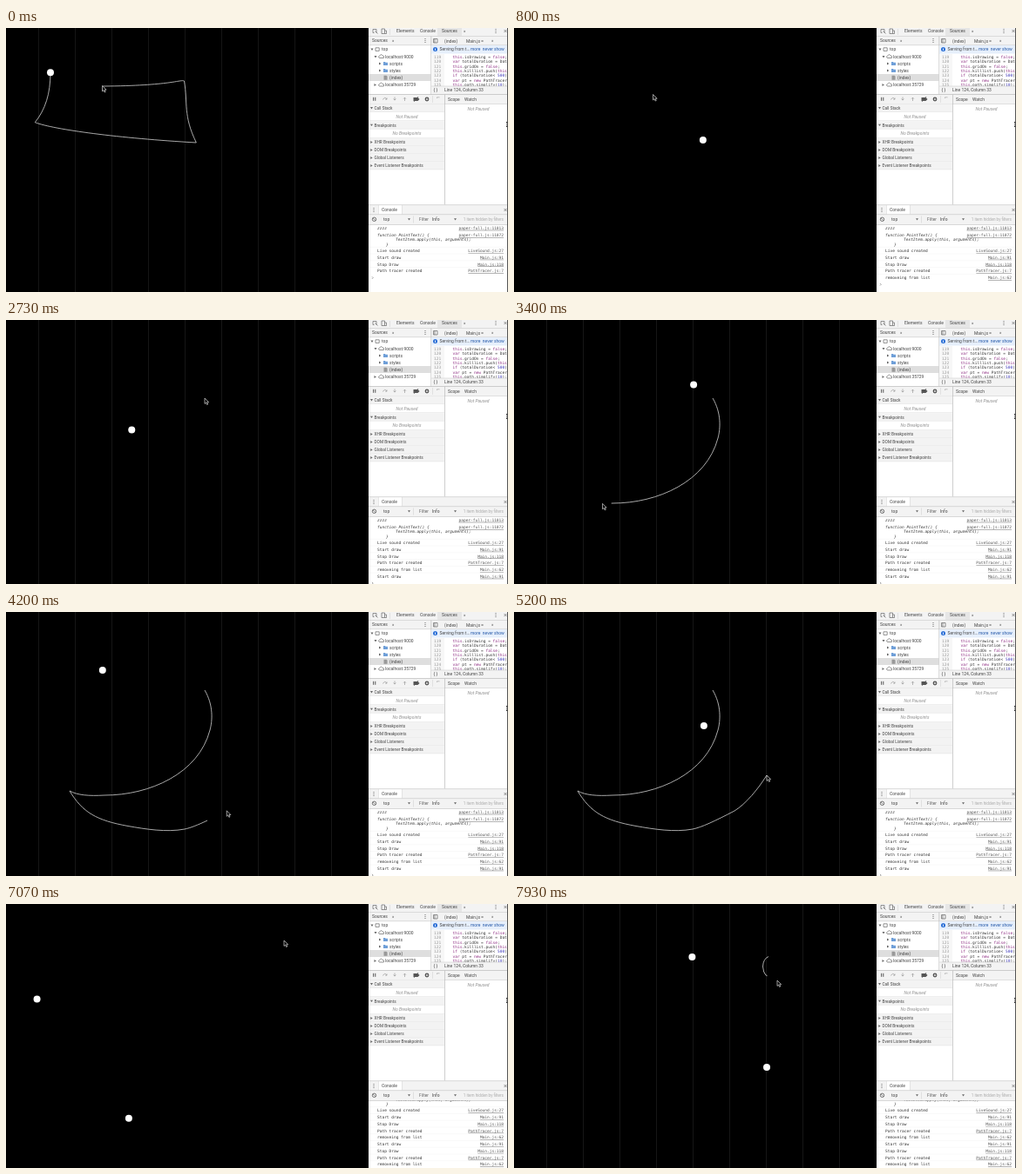
An HTML page that plays this animation: 576x304 px, repeating every 8 s.

```html
<!DOCTYPE html>
<html lang="en">
<head>
<meta charset="utf-8">
<title>Path tracer</title>
<style>
  html, body { margin: 0; width: 100%; height: 100%; overflow: hidden; background: #000; }
  svg { display: block; width: 576px; height: 304px; }
  text { font: 4.95px Roboto, sans-serif; fill: #444; white-space: pre; }
  text.mono { font: 4.5px "DejaVu Sans Mono", monospace; fill: #333; }
  text.link { text-decoration: underline; fill: #555; }
  text.idle { font-style: italic; fill: #909090; }
  text.italic { font-style: italic; }
  .keyword { fill: #8c2a80; }
  .number { fill: #3a34b8; }
  .trail { fill: none; stroke: #d4d4d4; stroke-width: .8; }
</style>
</head>
<body>
<svg id="stage" viewBox="0 0 576 304">
  <defs>
    <clipPath id="codeClip"><rect x="488" y="30" width="87" height="37"/></clipPath>
    <clipPath id="logClip"><rect x="416" y="226.5" width="160" height="78"/></clipPath>
  </defs>
</svg>
<script>
const LOOP = 8000;
const stage = document.getElementById('stage');

function add(tag, attrs, parent = stage) {
  const node = document.createElementNS('http://www.w3.org/2000/svg', tag);
  for (const key in attrs) node.setAttribute(key, attrs[key]);
  parent.append(node);
  return node;
}
const rect = (x, y, width, height, fill) => add('rect', { x, y, width, height, fill });
const stroke = (d, color = '#666', width = .7) =>
  add('path', { d, fill: 'none', stroke: color, 'stroke-width': width });
const fill = (d, color = '#666') => add('path', { d, fill: color });

// y is the vertical middle of the lettering
function label(x, y, string, attrs = {}, parent = stage) {
  const node = add('text', { x, y: y + 1.8, ...attrs }, parent);
  node.textContent = string;
  return node;
}
const right = (x, y) => fill(`M${x},${y - 1.5}l2.4,1.5l-2.4,1.5z`);
const down = (x, y) => fill(`M${x},${y - 1}h3l-1.5,2.4z`);
const dots = (x, y) => [-2, 0, 2].forEach(dy => rect(x - .5, y + dy - .5, 1, 1, '#666'));

// ---------- drawing area ----------
const grid = add('g', { stroke: '#161616', 'stroke-width': 1 });
for (let x = 37.5; x < 410; x += 42) add('path', { d: `M${x},0V304` }, grid);

// A trail is a list of segments; positions along it are counted in segments.
function makeTrail(start, segments) {
  const node = add('path', { class: 'trail' });
  const ends = [0];
  let d = start;
  for (const segment of segments) {
    node.setAttribute('d', d += segment);
    ends.push(node.getTotalLength());
  }
  const lengthAt = u => {
    const i = Math.min(Math.floor(u), segments.length - 1);
    return ends[i] + (u - i) * (ends[i + 1] - ends[i]);
  };
  return {
    node,
    pointAt: u => node.getPointAtLength(lengthAt(u)),
    reveal: u => node.setAttribute('stroke-dasharray', `${lengthAt(u)} 2000`)
  };
}

const boxTrail = makeTrail('M51,51', [
  'C51,76 45,94 33.3,108.7',
  'C55,117 130,127 218.3,132',
  'C203,100 209,88 204.5,61',
  'C200,59 190,66.5 110.8,67'
]);
const curveTrail = makeTrail('M228,90', [
  'C238,107 237,125 234,136C221,186 165,211 113,211C95,212 82,211 73,206',
  'C88,231 104,240 140,246.5',
  'C160,250 184,254 205,250C215,248 230,241 253,229',
  'C266,221 280,204 290,188'
]);
const hookTrail = makeTrail('M292,60.5', ['Q286,63 285.5,72Q286,79 289,82', 'L302,88']);

// Keys are [time, value] pairs
function track(keys, t) {
  if (t <= keys[0][0]) return keys[0][1];
  for (let i = 1; i < keys.length; i++) {
    const [t0, v0] = keys[i - 1], [t1, v1] = keys[i];
    if (t < t1) return v0 + (v1 - v0) * (t - t0) / (t1 - t0);
  }
  return keys[keys.length - 1][1];
}
const boxKeys = [[0, 0], [240, .92], [380, 1.008], [500, 1.6], [640, 1.96],
  [900, 2.1], [1110, 2.65], [1240, 3], [1410, 3.19], [1720, 4]];
const curveKeys = [[250, 0], [290, .06], [900, 1], [1340, 1], [1490, 2], [1620, 3], [1790, 4]];
const hookKeys = [[7800, 0], [7900, 1], [7930, 2]];

const BOX_PERIOD = 2230, CURVE_START = 2580, CURVE_STOP = 5580, HOOK_START = 7700, FADE = 280;

const balls = [0, 1].map(() => add('circle', { r: 4, fill: '#fff' }));
const place = (ball, p) => { ball.setAttribute('cx', p.x); ball.setAttribute('cy', p.y); };
const cursor = add('path', {
  d: 'M0,0V6.4L1.5,5.1L2.6,7.5L3.7,7L2.6,4.7H4.6Z',
  fill: '#000', stroke: '#ddd', 'stroke-width': .7
});

// ---------- developer tools ----------
rect(416, 0, 160, 304, '#fff');
rect(416, 0, 160, 20, '#f3f3f3');
rect(416, 9, 160, .6, '#ccc');
rect(416, 19.5, 160, .6, '#ccc');
stroke('M421,1.5h4v4M421,1.5v4h1.5M423.5,3.5l3,3M431,1h3.5v5.5h-3.5zM434.5,3h2v3.5h-2');
rect(440, 1, .5, 7, '#ccc');
rect(495, 0, 28, 9, '#e6e6e6');
label(448, 3.5, 'Elements');
label(475, 3.5, 'Console');
label(500, 3.5, 'Sources');
label(525, 3.3, '»');
dots(562, 3.5);
stroke('M571.5,2l3,3m0,-3l-3,3');

label(420, 14.5, 'Sources');
label(443, 14.3, '»');
dots(481, 14.5);
stroke('M490.5,12.5h4.5v4.5h-4.5zM492,12.5v4.5');
label(503, 15, '(index)');
label(528, 15, 'Main.js');
stroke('M545.5,14l2,2m0,-2l-2,2');
label(557, 14.5, '»');

// file tree
rect(416, 53, 71.5, 8, '#dedede');
down(418.5, 24.5);
stroke('M424,22.8h4.2v3.6h-4.2z');
label(431, 24.5, 'top');
[[33, 'localhost:9000', down], [65.5, 'localhost:35729', right]].forEach(([y, host, arrow]) => {
  arrow(422.5, y);
  stroke(`M428.3,${y + 1.5}q-2,-2 .5,-2.5q1.5,-3 3,-.4q2.6,.2 1.6,2.9z`);
  label(435, y, host);
});
[[41, 'scripts'], [49, 'styles']].forEach(([y, name]) => {
  right(428, y);
  fill(`M433,${y - 2}h2l.6,.7h2.4v3.4h-5z`, '#6f9fd8');
  label(440, y, name);
});
fill('M433.5,54.7h3l1,1v4h-4z', '#999');
label(440, 57, '(index)');

// source editor
rect(487.5, 9.5, .7, 67, '#bbb');
rect(488, 20, 88, 9.5, '#e6effb');
add('circle', { cx: 492.5, cy: 24.5, r: 2.5, fill: '#2b6fd6' });
rect(492.1, 24, .8, 2, '#fff');
rect(492.1, 22.9, .8, .7, '#fff');
label(497.5, 24.5, 'Serving from t…');
label(533, 24.5, 'more  never show', { style: 'fill:#2458a8' });

const code = add('g', { 'clip-path': 'url(#codeClip)' });
add('rect', { x: 488, y: 30, width: 15, height: 37, fill: '#f7f7f7' }, code);
['this.isDrawing = false;', 'var totalDuration = Date', 'this.gridOn = false;',
 'this.killlist.push(this', 'if (totalDuration< 500)', 'var pt = new PathTracer',
 'this.path.simplify(10);'].forEach((line, i) => {
  const y = 33 + i * 5.35;
  label(491, y, 119 + i, { class: 'mono', style: 'fill:#999' }, code);
  const row = label(512.5, y, '', { class: 'mono' }, code);
  for (const part of line.split(/(\b(?:this|var|if|new|false|\d+)\b)/)) {
    const kind = /^\d+$/.test(part) ? 'number' : /^(this|var|if|new|false)$/.test(part) ? 'keyword' : '';
    add('tspan', { class: kind }, row).textContent = part;
  }
});
rect(488, 67, 88, 9.5, '#f3f3f3');
rect(488, 66.7, 88, .6, '#ccc');
label(490.5, 71, '{ }');
label(503, 71, 'Line 124, Column 33');

// debugger
rect(416, 76.5, 160, 10.5, '#f3f3f3');
rect(416, 76.3, 160, .7, '#bbb');
rect(416, 87, 160, .6, '#ccc');
rect(421, 79.8, 1.1, 4, '#666');
rect(423.2, 79.8, 1.1, 4, '#666');
stroke('M432.5,82.5q2,-4 4.5,-.5m0,-1.6v1.8h-1.8', '#999');
stroke('M446,79.5v3.5m-1.4,-1.4l1.4,1.5l1.4,-1.5', '#999');
stroke('M457.5,84v-3.8m-1.4,1.4l1.4,-1.5l1.4,1.5', '#999');
fill('M467.5,80h5l2,2l-2,2h-5z', '#555');
stroke('M468,85l5,-6', '#555');
add('circle', { cx: 483, cy: 82, r: 2.4, fill: '#555' });
rect(482, 80.9, .7, 2.2, '#fff');
rect(483.4, 80.9, .7, 2.2, '#fff');
rect(489.5, 78, .5, 8, '#ccc');
stroke('M494.5,81v-1.2h3', '#aaa');
label(507, 82, 'Scope');
label(526, 82, 'Watch');
label(529.5, 93, 'Not Paused', { class: 'idle' });
[[92, 'Call Stack', 'Not Paused'], [111.7, 'Breakpoints', 'No Breakpoints'], [131.5, 'XHR Breakpoints'],
 [140.5, 'DOM Breakpoints'], [149.5, 'Global Listeners'], [158.5, 'Event Listener Breakpoints']
].forEach(([y, title, note]) => {
  rect(416, y - 4.5, 87, 9, '#f3f3f3');
  rect(416, y + 4.2, 87, .5, '#dedede');
  if (note) {
    down(418, y);
    label(460, y + 9.8, note, { class: 'idle', 'text-anchor': 'middle' });
    rect(416, y + 14.4, 87, .5, '#dedede');
  } else right(418.3, y);
  label(422.5, y, title, { style: 'font-size:4.75px' });
});
rect(503, 76.5, .7, 127, '#bbb');
fill('M574,108h2v1h-.7v4h.7v1h-2v-1h.6v-4h-.6z', '#222');

// console
rect(416, 203.5, 160, 23, '#f3f3f3');
rect(427, 204, 27.5, 10.5, '#fff');
[203.5, 214.5, 226].forEach(y => rect(416, y, 160, .6, '#c4c4c4'));
[427, 454.5].forEach(x => rect(x, 204, .5, 10.5, '#ccc'));
dots(422, 209.5);
label(431, 209.5, 'Console');
stroke('M571.5,208l3,3m0,-3l-3,3');
add('circle', { cx: 422.5, cy: 220.3, r: 2.2, fill: 'none', stroke: '#555', 'stroke-width': .8 });
stroke('M421,218.8l3,3', '#555');
label(433, 220.3, 'top');
down(461, 220.2);
rect(467, 216.5, .5, 8, '#ccc');
label(474, 220.3, 'Filter', { style: 'fill:#666' });
label(489, 220.3, 'Info');
down(514, 220.2);
label(571, 220.3, '1 item hidden by filters', { 'text-anchor': 'end', style: 'font-size:4.6px;fill:#aaa' });

const logView = add('g', { 'clip-path': 'url(#logClip)' });
const log = add('g', {}, logView);
const ROW = 7.75;
label(426, 230, 'zzzz', { class: 'mono italic' }, log);
label(426, 238.3, 'function PointText() {', { class: 'mono italic' }, log);
label(447, 243.6, 'TextItem.apply(this, arguments);', { class: 'mono italic' }, log);
label(436, 249, '}', { class: 'mono italic' }, log);
const link = (y, string, parent) =>
  label(571, y, string, { class: 'mono link', 'text-anchor': 'end' }, parent);
link(230, 'paper-full.js:11013', log);
link(238.3, 'paper-full.js:11072', log);

const messages = [
  [0, 'Live sound created', 'LiveSound.js:27'],
  [0, 'Start draw', 'Main.js:91'],
  [0, 'Stop Draw', 'Main.js:118'],
  [0, 'Path tracer created', 'PathTracer.js:7'],
  [FADE, 'removeing from list', 'Main.js:62'],
  [CURVE_START, 'Start draw', 'Main.js:91'],
  [CURVE_STOP, 'Stop Draw', 'Main.js:118'],
  [CURVE_STOP, 'Path tracer created', 'PathTracer.js:7'],
  [CURVE_STOP + FADE, 'removeing from list', 'Main.js:62']
].map(([time, string, source], i) => {
  const row = add('g', {}, log), y = 256.2 + i * ROW;
  add('path', { d: `M416,${y - 3.9}h160`, stroke: '#f2f2f2', 'stroke-width': .5 }, row);
  label(426, y, string, { class: 'mono' }, row);
  link(y, source, row);
  return { time, row };
});
const prompt = add('path', { fill: 'none', stroke: '#777', 'stroke-width': .7, d: 'M420,-1.2l1.2,1.2l-1.2,1.2' }, log);
rect(575, 0, 1, 304, '#555');

// ---------- motion ----------
const cursorX = [[300, 110.5], [1500, 228]];
const cursorY = [[300, 66.5], [1500, 90.5]];
const leaveX = [[6200, 290], [6900, 319], [7200, 319], [7750, 292]];
const leaveY = [[6200, 188], [6900, 42], [7200, 42], [7750, 60.5]];

function cursorAt(t) {
  if (t < CURVE_START) return { x: track(cursorX, t), y: track(cursorY, t) };
  if (t < CURVE_STOP) return curveTrail.pointAt(track(curveKeys, t - CURVE_START));
  if (t < 7800) return { x: track(leaveX, t), y: track(leaveY, t) };
  return hookTrail.pointAt(track(hookKeys, t));
}

const fadeAfter = (t, stop) => Math.max(0, Math.min(1, 1 - (t - stop) / FADE));
const PEN_LAG = 28;

function render(t) {
  const boxFade = fadeAfter(t, 0), curveFade = fadeAfter(t, CURVE_STOP);
  boxTrail.node.style.opacity = boxFade;
  curveTrail.node.style.opacity = curveFade;
  curveTrail.reveal(track(curveKeys, t - CURVE_START - PEN_LAG));
  hookTrail.reveal(track(hookKeys, t - PEN_LAG));
  grid.style.opacity = t < CURVE_START ? boxFade : t < HOOK_START ? curveFade : 1;

  place(balls[0], boxTrail.pointAt(track(boxKeys, t % BOX_PERIOD)));
  place(balls[1], curveTrail.pointAt(track(curveKeys, t - CURVE_STOP)));
  balls[1].style.display = t < CURVE_STOP ? 'none' : '';

  const tip = cursorAt(t);
  cursor.setAttribute('transform', `translate(${tip.x},${tip.y})`);

  let shown = 0;
  for (const { time, row } of messages) {
    row.style.display = t < time ? 'none' : '';
    if (t >= time) shown++;
  }
  const scroll = shown > 6 ? 18.6 - (9 - shown) * ROW : 0;
  log.setAttribute('transform', `translate(0,${-scroll})`);
  prompt.setAttribute('transform', `translate(0,${256.6 + shown * ROW})`);
}

const begin = performance.now();
function tick() {
  render((performance.now() - begin) % LOOP);
  requestAnimationFrame(tick);
}
tick();
</script>
</body>
</html>
```
